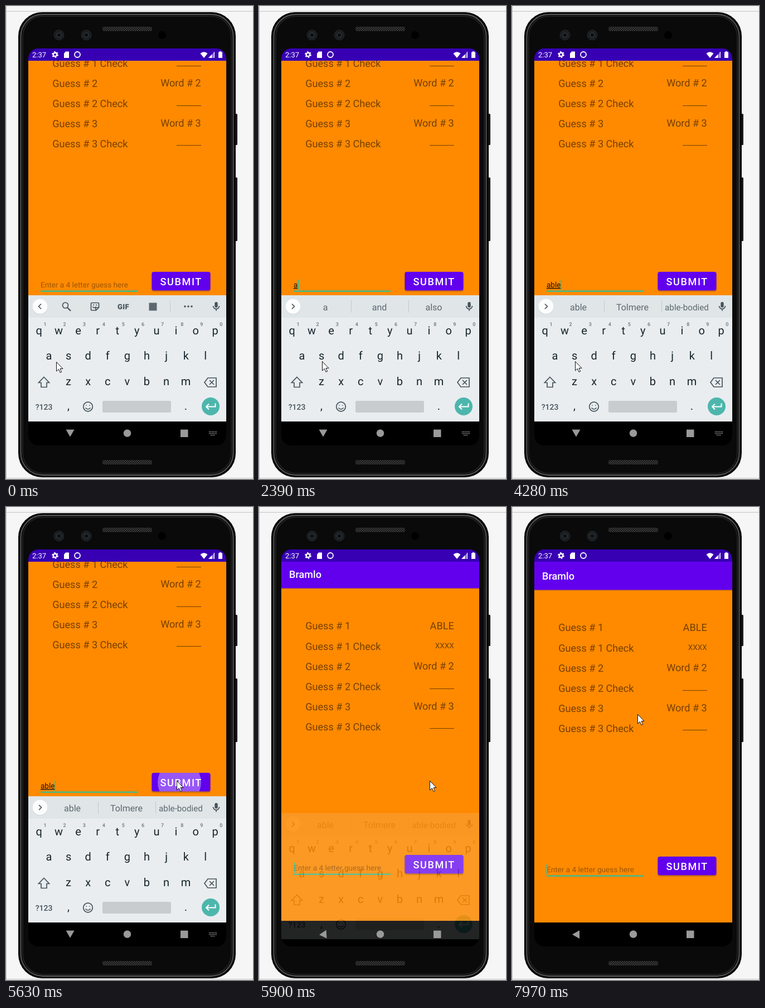
An HTML page that plays this animation: 443 px wide and 847 px high, repeating every 8 s.

```html
<!DOCTYPE html>
<html lang="en">
<head>
<meta charset="utf-8">
<title>Word guess</title>
<style>
  html, body { margin: 0; width: 100%; height: 100%; overflow: hidden; background: #f6f6f6; }
  svg { display: block; width: 443px; height: 847px; }
  text { font-family: Roboto, sans-serif; text-rendering: geometricPrecision; white-space: pre; }
  .row { font-size: 18.1px; fill: #000; fill-opacity: .54; }
  .row.small, .small { font-size: 13.56px; }
  .end { text-anchor: end; }
  .mid { text-anchor: middle; }
  .title { font-size: 18.1px; font-weight: 500; fill: #fff; }
  .submit { font-size: 18.1px; font-weight: 500; letter-spacing: 1.6px; fill: #fff; }
  .key { font-size: 20px; fill: #17242a; text-anchor: middle; }
  .digit { font-size: 9px; font-weight: 500; fill: #68747a; text-anchor: middle; }
  .word { font-size: 16px; fill: #5c686e; text-anchor: middle; }
  .line { fill: none; stroke: #46535a; stroke-width: 1.7; }
</style>
</head>
<body>
<svg viewBox="0 0 443 847">
  <defs>
    <clipPath id="screen"><rect x="40" y="76" width="355" height="711" rx="18"/></clipPath>
    <clipPath id="content"><rect x="40" y="98" width="355" height="646"/></clipPath>
    <clipPath id="button"><rect x="261.5" y="626" width="105" height="33.300" rx="3.500"/></clipPath>
    <pattern id="mesh" width="4" height="4" patternUnits="userSpaceOnUse">
      <rect width="4" height="4" fill="#161616"/>
      <path d="M0 0l4 4M4 0l-4 4" stroke="#444" stroke-width=".8"/>
    </pattern>
    <filter id="lift" x="-10%" y="-20%" width="120%" height="160%">
      <feDropShadow dx="0" dy="1.6" stdDeviation="1.2" flood-opacity=".35"/>
    </filter>
  </defs>

  <rect width="443" height="847" fill="#f6f6f6"/>
  <path d="M0 9.5H443M0 845.5H443M.5 0V847" stroke="#c2c2c2"/>

  <g id="phone">
    <rect x="410" y="193" width="5" height="56" rx="1.5" fill="#1c1c1c"/>
    <rect x="410" y="307" width="5" height="114" rx="1.5" fill="#1c1c1c"/>
    <rect x="22" y="11" width="390" height="833" rx="43" fill="#050505"/>
    <rect x="26.500" y="15" width="381" height="825" rx="39.500" fill="#0a0a0a" stroke="#5a5a5a" stroke-width="1.800"/>
    <rect x="30" y="18" width="374" height="819" rx="36.500" fill="#0a0a0a" stroke="#202020" stroke-width="2"/>
    <rect x="173" y="37" width="89" height="8" rx="3" fill="url(#mesh)"/>
    <rect x="173" y="813" width="89" height="8" rx="3" fill="url(#mesh)"/>
    <g fill="#1b1e20" stroke="#24282a">
      <circle cx="95" cy="52" r="9"/><circle cx="144" cy="52" r="9"/>
    </g>
    <g fill="#0b0d10" stroke="#3a4146">
      <circle cx="95" cy="52" r="4"/><circle cx="144" cy="52" r="4"/>
    </g>
    <circle cx="280" cy="52" r="7" fill="#000"/>
  </g>

  <g clip-path="url(#screen)">
    <rect x="40" y="76" width="355" height="711" fill="#000"/>

    <g clip-path="url(#content)">
      <g id="app">
        <rect x="40" y="98" width="355" height="646" fill="#ff8a00"/>
        <rect x="40" y="148" width="355" height="2" fill-opacity=".12"/>
        <rect x="40" y="98" width="355" height="50.500" fill="#6200ee"/>
        <text class="title" x="54" y="130">Bramlo</text>
        <g id="rows"></g>
        <text class="small" id="hint" x="62" y="654" fill-opacity=".38">Enter a 4 letter guess here</text>
        <text class="small" id="typed" x="62" y="654" fill-opacity=".87" text-decoration="underline"></text>
        <rect x="62" y="659.600" width="174" height="2" fill="#18c6a8"/>
        <rect id="caret" y="640" width="1.8" height="18" fill="#10cdb4"/>
        <rect x="261.500" y="626" width="105" height="33.300" rx="3.500" fill="#6200ee" filter="url(#lift)"/>
        <g clip-path="url(#button)">
          <circle id="ripple" cx="311" cy="643" fill="#fff"/>
        </g>
        <text class="submit" x="276.500" y="649.600">SUBMIT</text>
      </g>
    </g>

    <g id="status">
      <rect x="40" y="76" width="355" height="22" fill="#3700b3"/>
      <text x="47" y="91.800" font-size="13" fill="#fff">2:37</text>
      <g fill="none" stroke="#fff">
        <circle cx="88" cy="87" r="3.2" stroke-width="2.4"/>
        <circle cx="88" cy="87" r="4.9" stroke-width="2" stroke-dasharray="2.6 2.53"/>
        <circle cx="128" cy="87" r="5" stroke-width="1.8"/>
      </g>
      <g fill="#fff">
        <path d="M104 85l3-3.5h6V93h-9z"/>
        <path d="M355 93l-6.5-8q6.5-5.5 13 0z"/>
        <path d="M374 82v11h-11z" fill-opacity=".4"/>
        <path d="M369.5 86.5V93h-6.5zM374 82v11h-1.2V82z"/>
        <path d="M381 82.5h1.8v-1.3h3.4v1.3h1.8V93h-7z"/>
      </g>
    </g>

    <g id="keyboard">
      <rect x="40" y="518" width="355" height="226" fill="#e9edf0"/>
      <rect x="40" y="518" width="355" height="40" fill="#e0e5e8"/>
      <circle cx="61" cy="538.6" r="13.7" fill="#000" fill-opacity=".12"/>
      <circle cx="61" cy="538" r="13.5" fill="#fcfdfd"/>
      <path id="chevron" class="line" d="M63 533.5l-4.5 4.5 4.5 4.5"/>

      <g id="tools" class="line">
        <circle cx="106.5" cy="536" r="5"/><path d="M110 540l6 6" stroke-width="2.2"/>
        <path d="M154 531.5h11a1.5 1.5 0 0 1 1.5 1.5v7l-5 5H154a1.5 1.5 0 0 1-1.5-1.5V533a1.5 1.5 0 0 1 1.5-1.5zM166 540h-5v5M155.5 538.5q3 4 6 0"/>
        <path d="M156 535.3h2M161 535.3h2"/>
        <text class="mid" x="210.5" y="542.6" font-size="13" font-weight="900" fill="#46535a" stroke="none" letter-spacing=".4">GIF</text>
        <rect x="256.5" y="531.5" width="14" height="14" fill="#5c686e" stroke="none"/>
        <path d="M294.5 528v20" stroke="#c6cccf" stroke-width="1"/>
        <path d="M321 538h.01M327 538h.01M333 538h.01" stroke-width="3.6" stroke-linecap="round"/>
      </g>
      <g id="words">
        <path d="M165.5 527v22M268.5 527v22" stroke="#c2c9cd"/>
        <text class="word" x="119" y="544.5"></text>
        <text class="word" x="216" y="544.5"></text>
        <text class="word" x="313.5" y="544.5"></text>
      </g>
      <rect x="374.3" y="530" width="5.4" height="10" rx="2.7" fill="#46535a"/>
      <path class="line" d="M371.5 537a5.5 5.5 0 0 0 11 0M377 542.5v3.5"/>

      <g id="keys"></g>
      <path class="line" d="M68 664.5l9.5 10h-4.5v8h-10v-8h-4.5z"/>
      <path class="line" d="M356 674l6-8h15v16h-15zM365 670l8 8M373 670l-8 8"/>
      <text class="mid" x="68" y="722.5" font-size="14" font-weight="500" fill="#46535a">?123</text>
      <circle class="line" cx="147" cy="717.5" r="8.3"/>
      <path class="line" d="M142.5 719.5q4.5 5 9 0"/>
      <path class="line" stroke-linecap="round" d="M144 715h.01M150 715h.01" stroke-width="2.4"/>
      <rect x="173" y="707" width="123" height="21" rx="2.5" fill="#c8cccf"/>
      <circle cx="367" cy="717" r="16" fill="#4db6ac"/>
      <path d="M375.5 711.5v6H359M364 712.5l-5 5 5 5" fill="none" stroke="#fff" stroke-width="2"/>
    </g>

    <g id="nav" fill="#9a9a9a">
      <path id="back" d="M107.5 758.5h15l-7.5 13z"/>
      <circle cx="217.5" cy="765" r="6.7"/>
      <rect x="313" y="758.5" width="13.5" height="13.5"/>
      <path id="hide" d="M364 762.5h14M364 765.5h14M367 768.5h8" stroke="#9a9a9a" stroke-width="1.3" stroke-dasharray="1.5 1"/>
    </g>
  </g>

  <path id="pointer" d="M.5.5v16.5l3.8-3.6 2.7 6 2.6-1.1-2.6-5.8h5z" fill="#fff" stroke="#111" stroke-linejoin="round"/>
</svg>

<script>
const $ = id => document.getElementById(id);
const LOOP = 8000, SUBMIT = 5780;

const text = (cls, x, y, s) => `<text class="${cls}" x="${x}" y="${y}">${s}</text>`;
const rowY = i => Math.round(222.4 + 36.15 * i);

$('rows').innerHTML = [1, 2, 3].map(n => {
  const y = rowY(2 * n - 2), checkY = rowY(2 * n - 1);
  const rightY = Math.round(150.6 + 71.8 * n), blankY = Math.round(185.6 + 71 * n);
  const blank = `<rect x="306" y="${blankY}" width="44" height="1" fill-opacity=".54"/>`;
  const pending = text('row end', 349.7, rightY, `Word # ${n}`) + blank;
  return text('row', 83.2, y, `Guess # ${n}`) +
    text('row', 83.2, checkY, `Guess # ${n} Check`) +
    (n > 1
      ? pending
      : `<g id="before">${pending}</g>` +
        `<g id="after">${text('row end', 349.7, rightY, 'ABLE') +
          text('row end small', 349.7, checkY - 3, 'XXXX')}</g>`);
}).join('');

const keyRow = (letters, x, y) =>
  [...letters].map((c, i) => text('key', x + 35.1 * i, y, c)).join('');
$('keys').innerHTML =
  keyRow('qwertyuiop', 59.3, 588) +
  keyRow('asdfghjkl', 77, 633.3) +
  keyRow('zxcvbnm', 112, 679) +
  [...'1234567890'].map((d, i) => text('digit', 70 + 35.1 * i, 573, d)).join('') +
  text('key', 112, 723, ',') + text('key', 322.5, 723, '.');

const suggestions = {
  a: ['a', 'and', 'also'],
  ab: ['ab', 'about', 'abs'],
  abl: ['abl', 'able', 'ably'],
  able: ['able', 'Tolmere', 'able-bodied']
};
const wordSlots = document.querySelectorAll('.word');

// Each track lists [start time, values...]; a value holds until the next start.
const typing = [[0, ''], [2390, 'a'], [2960, 'ab'], [3110, 'abl'], [3420, 'able']];
const caretFlips = [560, 1110, 1420, 1950, 2390, 3850, 4280, 4710, 5210, 6290, 6860, 7280, 7820];
const pointer = [
  [0, 90, 637], [270, 92, 637], [830, 99, 637], [980, 109, 636], [1110, 113, 636],
  [4860, 130, 624], [5010, 210, 556], [5210, 296, 488], [5360, 306, 490],
  [6290, 322, 440], [6440, 370, 285], [6590, 398, 178], [6740, 395, 179],
  [6860, 387, 181], [7010, 372, 184], [7130, 355, 188], [7280, 340, 192],
  [7400, 323, 220], [7550, 291, 280], [7700, 257, 335], [7820, 235, 362], [7970, 225, 371]
];
// Content shift, keyboard drop, keyboard opacity, back-arrow turn
const panels = [[0, -150, 0, 1, 0], [SUBMIT, -25, 17, .69, 68], [5900, -3, 30, .15, 86], [6020, 0, 30, 0, 90]];
// Radius, opacity
const ripple = [[0, 0, 0], [5630, 39, .34], [SUBMIT, 70, .34], [5900, 70, .12], [6020, 0, 0]];

const at = (track, t) => track.findLast(step => step[0] <= t).slice(1);
const show = (id, on) => $(id).style.display = on ? '' : 'none';
const move = (id, value) => $(id).setAttribute('transform', value);

function draw(t) {
  const [word] = at(typing, t);
  const sent = t >= SUBMIT;
  const entry = sent ? '' : word;

  $('typed').textContent = entry;
  show('hint', !entry);
  show('before', !sent);
  show('after', sent);
  $('caret').setAttribute('x', 62 + (entry ? $('typed').getComputedTextLength() : 0));
  show('caret', caretFlips.filter(flip => flip <= t).length % 2);

  show('tools', !word);
  show('words', word);
  move('chevron', word ? 'rotate(180 61 538)' : '');
  (suggestions[word] || []).forEach((s, i) => {
    wordSlots[i].textContent = s;
    wordSlots[i].style.fontSize = s.length > 10 ? '15.2px' : '';
  });

  const [shift, drop, opacity, turn] = at(panels, t);
  move('app', `translate(0 ${shift})`);
  move('keyboard', `translate(0 ${drop})`);
  $('keyboard').setAttribute('opacity', opacity);
  move('back', `rotate(${turn} 114.5 765)`);
  show('hide', !sent);

  const [radius, glow] = at(ripple, t);
  $('ripple').setAttribute('r', radius);
  $('ripple').setAttribute('opacity', glow);

  move('pointer', `translate(${at(pointer, t)})`);
}

const start = performance.now();
function tick() {
  draw((performance.now() - start) % LOOP);
  requestAnimationFrame(tick);
}
tick();
</script>
</body>
</html>
```
